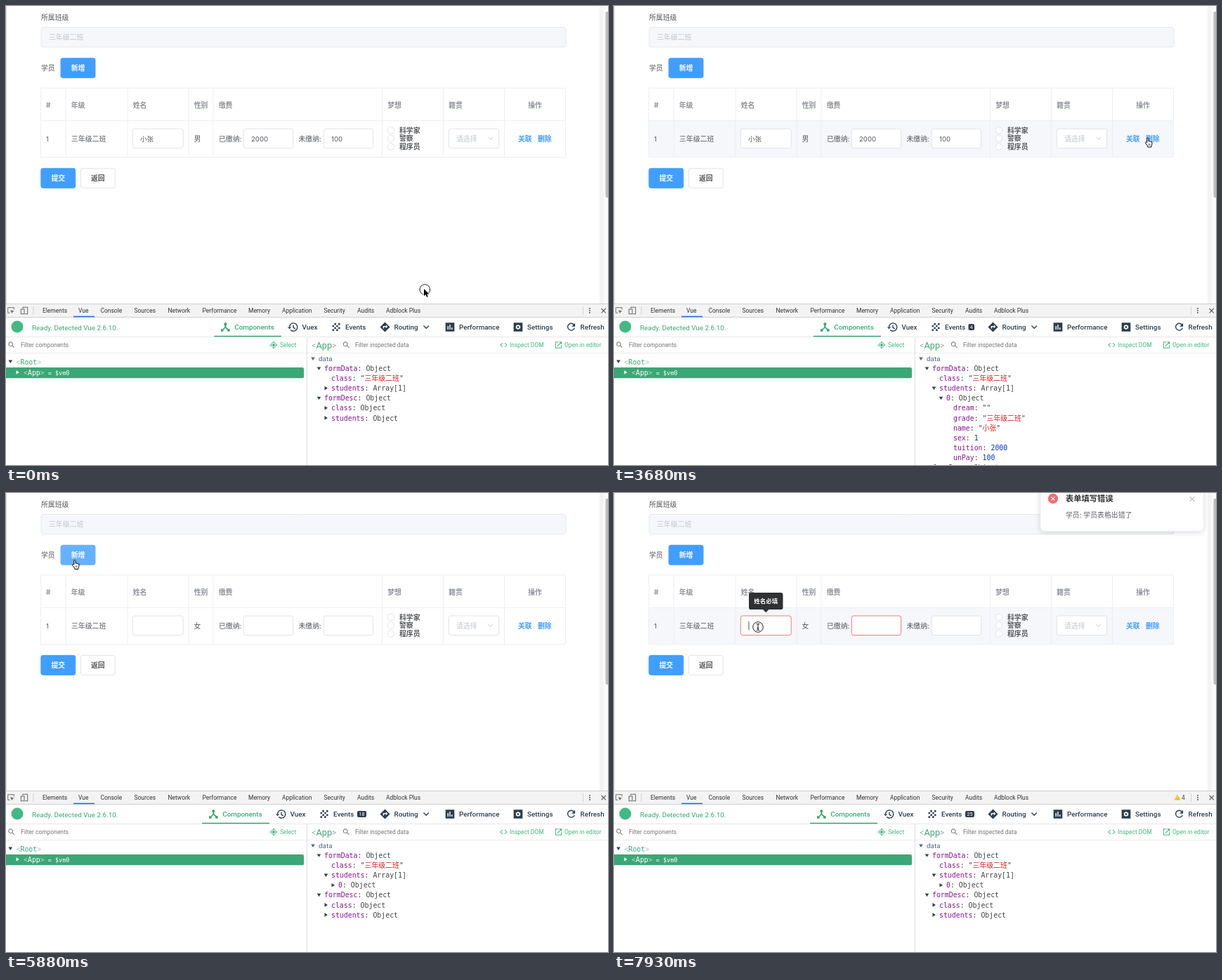
Write an HTML page with a canvas that moves like this. It is 857 px wide and 654 px high and loops after 8 s.

```html
<!DOCTYPE html>
<html lang="zh">
<head>
<meta charset="utf-8">
<title>Form and inspector</title>
<style>
html, body { margin: 0; width: 100%; height: 100%; overflow: hidden; background: #fff; }
canvas { display: block; }
</style>
</head>
<body>
<canvas id="stage" width="857" height="654"></canvas>
<script>
const ctx = document.getElementById('stage').getContext('2d');
const LOOP = 8000, STEP = 146.85;
const CJK = 'Inter, "Noto Sans CJK SC", "Noto Sans CJK", sans-serif';
const UI = 'Roboto, sans-serif';
const MONO = '"DejaVu Sans Mono", "Noto Sans CJK SC", "Noto Sans CJK", monospace';
const BLUE = '#409eff', LIGHT = '#66b1ff', DARK = '#3a8ee6';
const GREEN = '#3ba776', SLATE = '#2c3e50', INK = '#55575c', MUTED = '#909399', FAINT = '#c0c4cc';
const SM = 8.46, MD = 9.87, ROW = 14.1, CHAR = 5.942;

// Icons on a 24 unit grid: filled part, stroked part, stroke width
const ICONS = {
  hub: ['M9 6a3 3 0 1 1 4.5 2.5V12l5 4H21v5h-5v-3.2l-4-4-4 4V21H3v-5h4l3.5-4V8.5A3 3 0 0 1 9 6z'],
  history: ['M1 12h8l-4 4z', 'M5 12A8 8 0 1 1 7.3 17.7M12.7 8v5l4 2.3'],
  grain: ['', 'M10 6h.1M18 6h.1M6 10h.1M14 10h.1M10 14h.1M18 14h.1M6 18h.1M14 18h.1', 4],
  route: ['M12 2l10 10-10 10L2 12zM14 14.5V12h-4v3H8v-5h6V7.5l3.5 3.5z'],
  bars: ['M3 3h18v18H3zM7 10h2v7H7zM11 7h2v10h-2zM15 13h2v4h-2z'],
  gear: ['M3 3h18v18H3zM12 7l4.5 2.5v5L12 17l-4.5-2.5v-5zM12 10a2 2 0 1 1-.1 0z'],
  refresh: ['M13 11h7V4z', 'M17.5 7A7 7 0 1 0 18.7 14'],
  aim: ['M8 12a4 4 0 1 1 0 .1z', 'M19 12a7 7 0 1 1 0-.1M12 1v4M12 19v4M1 12h4M19 12h4'],
  code: ['', 'M8.7 6.7L3.4 12l5.3 5.3M15.3 6.7l5.3 5.3-5.3 5.3'],
  launch: ['', 'M12 4H4v16h16v-8M14 4h6v6M20 4L8.5 15.5'],
  search: ['', 'M15 9.5a5.5 5.5 0 1 1 0-.1M14 14l5.5 5.5'],
  edit: ['M3 17.2V21h3.8L17.8 9.9l-3.7-3.7zM15.1 5.1l2.6-2.6 3.8 3.8-2.6 2.6z'],
  add: ['M22 12a10 10 0 1 1 0-.1zM11 7h2v4h4v2h-4v4h-2v-4H7v-2h4z'],
  trash: ['M6 7h12v14H6zM5 4h3.5l1-1h5l1 1H19v2H5z'],
  more: ['', 'M12 6h.1M12 12h.1M12 18h.1', 4],
  inspect: ['M10 10l12 4-5 2-2 5z', 'M9 19H3V3h18v6'],
  device: ['', 'M8 6V3h13v18h-7M3 8h9v13H3z']
};
const ARROW = new Path2D('M0 0v10.3l2.4-2.2 1.6 3.6 1.7-.8-1.6-3.4h3.3z');
const HAND = new Path2D('M-1.2 6V.6a1.1 1.1 0 0 1 2.2 0V4l1.6.2 1.7.4 1.6.6v3.2l-1 2.8v1.3H-.2v-1.2L-3.3 7c-.8-1.2.6-2 1.4-1.2z');

// Pointer path: step, x, y
const PATH = [
  [0, 595, 403], [1, 595, 404], [4, 520, 478], [6, 451, 535], [7, 455, 543], [8, 456, 545],
  [11, 456, 546], [13, 447, 548], [15, 463, 557], [16, 466, 559], [19, 466, 560],
  [21, 560, 470], [22, 680, 320], [23, 752, 222], [24, 760, 188], [26, 760, 189],
  [28, 754, 198], [30, 754, 198], [31, 764, 212], [32, 690, 232], [33, 510, 222],
  [34, 300, 178], [35, 140, 128], [36, 66, 101], [37, 95, 97], [38, 98, 96],
  [41, 98, 96], [43, 95, 172], [44, 92, 234], [45, 90, 244], [46, 90, 245],
  [48, 92, 244], [50, 140, 214], [51, 180, 198], [52, 199, 192], [53, 204, 191], [54, 205, 191]
];

function pointer(n) {
  const i = PATH.findIndex(p => p[0] >= n);
  if (i <= 0) return PATH[i ? PATH.length - 1 : 0].slice(1);
  const a = PATH[i - 1], b = PATH[i], k = (n - a[0]) / (b[0] - a[0]);
  return [a[1] + (b[1] - a[1]) * k, a[2] + (b[2] - a[2]) * k];
}

const inside = ([x, y], x0, y0, x1, y1) => x >= x0 && x < x1 && y >= y0 && y < y1;

function text(s, x, y, color, size = MD, font = CJK, weight = 400, align = 'left') {
  ctx.font = `${weight} ${size}px ${font}`;
  ctx.fillStyle = color;
  ctx.textAlign = align;
  ctx.fillText(s, x, y + size * 0.37);
}

function rect(x, y, w, h, color) {
  ctx.fillStyle = color;
  ctx.fillRect(x, y, w, h);
}

function box(x, y, w, h, fill, line, r = 2.8) {
  ctx.beginPath();
  ctx.roundRect(x, y, w, h, r);
  if (fill) { ctx.fillStyle = fill; ctx.fill(); }
  if (line) { ctx.strokeStyle = line; ctx.lineWidth = 0.9; ctx.stroke(); }
}

function disc(x, y, r, fill, line, width = 1) {
  ctx.beginPath();
  ctx.arc(x, y, r, 0, Math.PI * 2);
  if (fill) { ctx.fillStyle = fill; ctx.fill(); }
  if (line) { ctx.strokeStyle = line; ctx.lineWidth = width; ctx.stroke(); }
}

function lines(d, color, width = 1) {
  ctx.strokeStyle = color;
  ctx.lineWidth = width;
  ctx.stroke(new Path2D(d));
}

function shape(d, color) {
  ctx.fillStyle = color;
  ctx.fill(new Path2D(d), 'evenodd');
}

function icon(name, x, y, size, color) {
  const [fill, line, width = 2] = ICONS[name], k = size / 24;
  ctx.save();
  ctx.translate(x - size / 2, y - size / 2);
  ctx.scale(k, k);
  ctx.lineCap = width > 2 ? 'round' : 'butt';
  if (fill) shape(fill, color);
  if (line) lines(line, color, width);
  ctx.restore();
}

function twisty(x, y, open, color = SLATE) {
  shape(open ? `M${x - 2.8} ${y - 2}h5.6l-2.8 4.4z` : `M${x - 2} ${y - 2.8}v5.6l4.4-2.8z`, color);
}

function button(label, x, y, fill) {
  const plain = !fill;
  box(x, y, 49, 28, fill || '#fff', fill || '#dcdfe6');
  text(label, x + 24.5, y + 14, plain ? INK : '#fff', MD, CJK, 700, 'center');
}

function field(x, w, value, line = '#dcdfe6') {
  box(x + 0.3, 175, w - 0.6, 27.6, '#fff', line);
  text(value, x + 11, 189, INK, 9.6);
}

function state(n) {
  const has = n < 26 || n >= 39;
  const badge = [[54, 25], [48, 23], [44, 21], [39, 18], [26, 7], [24, 4]].find(b => n >= b[0]);
  return {
    n, has, fresh: n >= 39, at: pointer(n), before: pointer(n - 1),
    badge: badge ? String(badge[1]) : '',
    open: n >= 9, deep: n >= 17 && n < 26,
    warn: n < 46 ? 0 : n < 48 ? 2 : 4,
    submitY: has ? 231 : 221.4
  };
}

function table(s) {
  const bottom = s.has ? 215.5 : 206, edge = '#ebeef5';
  if (s.has && inside(s.before, 50, 163, 797, 215)) rect(50, 163, 747, 52, '#f5f7fa');
  lines(`M49.5 117h747v${bottom - 117}h-747zM49.5 163.3h747`, edge);
  const cols = [85, 173, 260, 295, 535.5, 622.5, 709.5];
  lines(cols.map(x => `M${x} 117V${s.has ? bottom : 163}`).join(''), edge);
  const heads = ['#', '年级', '姓名', '性别', '缴费', '梦想', '籍贯'];
  heads.forEach((h, i) => text(h, i ? cols[i - 1] + 7.7 : 57, 141, MUTED, MD, CJK, 700));
  text('操作', 753, 141, MUTED, MD, CJK, 700, 'center');
  if (!s.has) return text('暂无数据', 423.5, 185, MUTED, MD, CJK, 400, 'center');

  const bad = s.n >= 47 ? '#f56c6c' : undefined;
  text('1', 57, 189, INK, 9.6);
  text('三年级二班', 93, 189, INK);
  field(180, 72.5, s.fresh ? '' : '小张', bad);
  text(s.fresh ? '女' : '男', 267.5, 189, INK);
  text('已缴纳:', 303, 189, INK);
  field(338, 71, s.fresh ? '' : '2000', bad);
  text('未缴纳:', 416.5, 189, INK);
  field(452, 71, s.fresh ? '' : '100');
  ['科学家', '警察', '程序员'].forEach((d, i) => {
    const y = 177 + i * 11.7;
    disc(548, y, 4.8, '#fff', '#dcdfe6', 0.8);
    text(d, 560, y, INK, MD, CJK, 700);
  });
  field(630, 72, '');
  text('请选择', 641, 189, FAINT);
  lines('M686.5 187l3.3 3.4 3.3-3.4', FAINT, 0.9);
  text('关联', 729, 189, BLUE, MD, CJK, 700);
  text('删除', 757, 189, BLUE, MD, CJK, 700);
}

function notice(n) {
  if (n < 46) return;
  const x = 607 + ([234, 12][n - 46] || 0);
  ctx.save();
  ctx.beginPath();
  ctx.rect(0, 0, 851, 424);
  ctx.clip();
  ctx.shadowColor = 'rgba(0,0,0,.16)';
  ctx.shadowBlur = 9;
  ctx.shadowOffsetY = 1.4;
  box(x, -12, 232.5, 66.5, '#fff', null, 5.6);
  ctx.shadowColor = 'transparent';
  box(x, -12, 232.5, 66.5, null, '#ebeef5', 5.6);
  disc(x + 18, 8, 7.2, '#f56c6c');
  lines(`M${x + 15.6} 5.6l4.8 4.8m0-4.8l-4.8 4.8`, '#fff', 1.2);
  text('表单填写错误', x + 36, 8, '#303133', 11.28, CJK, 700);
  text('学员: 学员表格出错了', x + 36, 31, '#606266');
  lines(`M${x + 212.5} 5l7 7m0-7l-7 7`, MUTED, 0.9);
  ctx.restore();
}

function page(s) {
  const { n, at } = s;
  rect(0, 0, 857, 424, '#fff');
  rect(845, 0, 6, 424, '#f4f4f4');
  rect(851, 0, 6, 424, '#fafafa');
  rect(0, 0, 1, 424, '#dcdcdc');
  box(853.5, 8, 5, 265, '#bcbcbc', null, 2);
  text('所属班级', 50, 16, INK);
  box(50, 30.5, 747, 28, '#f5f7fa', '#e4e7ed');
  text('三年级二班', 61, 44.5, FAINT);
  text('学员', 50, 88.5, INK);
  const addOn = inside(at, 78, 74, 127, 102) || (n >= 38 && n < 46);
  button('新增', 78, 74.3, n === 38 ? DARK : addOn ? LIGHT : BLUE);
  table(s);
  const y = s.submitY;
  const sendOn = inside(at, 50, y, 99, y + 28) || (n > 46 && n < 54);
  button('提交', 49.8, y + 0.3, n === 46 ? DARK : sendOn ? LIGHT : BLUE);
  button('返回', 106.3, y + 0.3);
  if (n >= 54) {
    box(192, 142, 48.5, 24, '#303133');
    shape('M212 166h8.4l-4.2 4.2z', '#303133');
    text('姓名必填', 216.2, 154, '#fff', SM, CJK, 700, 'center');
    rect(191.5, 183, 0.9, 12, '#444');
  }
  notice(n);
}

function toolbar(s) {
  rect(0, 424, 857, 20, '#f3f3f3');
  rect(0, 424, 857, 1, '#cfcfcf');
  rect(0, 443, 857, 1, '#cfcfcf');
  icon('inspect', 7, 434, 11.5, '#6a6a6a');
  icon('device', 26, 434, 12.5, '#6a6a6a');
  rect(38.5, 428, 0.8, 12, '#ccc');
  rect(821, 428, 0.8, 12, '#ccc');
  const tabs = { Elements: 52, Vue: 103, Console: 134.5, Sources: 182.5, Network: 230.5, Performance: 279.5,
    Memory: 345, Application: 393, Security: 452.5, Audits: 500, 'Adblock Plus': 541 };
  for (const t in tabs) text(t, tabs[t], 434, '#333', SM, UI);
  rect(96, 441.7, 30, 1.6, '#1a73e8');
  if (s.warn) {
    shape('M802 429.5l4.3 8h-8.6z', '#f5bd00');
    rect(801.6, 432.3, 0.8, 2.6, '#fff');
    text(s.warn, 808, 434, '#444', SM, UI);
  }
  icon('more', 831, 434, 12, '#5a5a5a');
  lines('M847.5 431l6.4 6.4m0-6.4l-6.4 6.4', '#5a5a5a', 1.1);
}

function header(s) {
  disc(16, 457, 8.5, '#42b983');
  text('Ready. Detected Vue 2.6.10.', 37, 458, GREEN, MD, UI);
  const shift = [0, -12, -17][s.badge.length];
  const tab = (name, glyph, x, color = SLATE) => {
    icon(glyph, x, 457.5, 16.9, color);
    text(name, x + 13, 457.5, color, MD, UI, 500);
  };
  tab('Components', 'hub', 312.3 + shift, GREEN);
  tab('Vuex', 'history', 408.5 + shift);
  tab('Events', 'grain', 470 + shift);
  tab('Routing', 'route', 539.5);
  tab('Performance', 'bars', 632);
  tab('Settings', 'gear', 729);
  tab('Refresh', 'refresh', 804.5);
  lines('M594.5 455.5l3.7 3.8 3.7-3.8', SLATE, 1.4);
  if (s.badge) {
    const w = s.badge.length > 1 ? 13 : 8.5;
    box(513 - w, 453, w, 9, SLATE, null, 2);
    text(s.badge, 513 - w / 2, 457.5, '#fff', 7, UI, 400, 'center');
  }
  rect(0, 471, 857, 0.8, '#e3e3e3');
  rect(296 + shift, 469.8, 96, 1.5, GREEN);
}

function treeRows(s) {
  const rows = [['formData', 'Object', 1, true], ['class', '"三年级二班"', 2],
    ['students', s.has ? 'Array[1]' : 'Array[0]', 2, s.open]];
  if (s.open && s.has) rows.push(['0', 'Object', 3, s.deep]);
  if (s.deep) rows.push(['dream', '""', 4], ['grade', '"三年级二班"', 4], ['name', '"小张"', 4],
    ['sex', '1', 4], ['tuition', '2000', 4], ['unPay', '100', 4]);
  return rows.concat([['formDesc', 'Object', 1, true], ['class', 'Object', 2, false], ['students', 'Object', 2, false]]);
}

function inspector(s) {
  twisty(437, 502.5, true, '#486887');
  text('data', 445, 502.3, '#486887', MD, UI);
  treeRows(s).forEach(([key, value, depth, open], i) => {
    const y = 502.3 + ROW * (i + 1), x = 443 + depth * 10;
    const vx = x + (key.length + 2) * CHAR;
    if (open !== undefined) twisty(x - 7.5, y, open);
    text(key, x, y, '#881391', MD, MONO);
    text(':', x + key.length * CHAR, y, '#444', MD, MONO);
    if (value[0] === '"') {
      const str = value.slice(1, -1), end = vx + CHAR + str.length * MD;
      text('"', vx, y, '#444', MD, MONO);
      text(str, vx + CHAR, y, '#d0211c', MD, MONO);
      text('"', end, y, '#444', MD, MONO);
    } else {
      text(value, vx, y, isNaN(value) ? '#444' : '#0033cc', MD, MONO);
    }
    if (open !== undefined && inside(s.at, 430, y - ROW / 2, 857, y + ROW / 2)) {
      const end = vx + value.length * CHAR;
      icon('edit', end + 10, y, 12, SLATE);
      icon('add', end + 29, y, 11.3, SLATE);
      icon('trash', end + 54, y, 12, SLATE);
      icon('more', end + 77, y, 11.3, SLATE);
    }
  });
  if (s.n >= 8 && s.n < 17) {
    ctx.strokeStyle = '#5a9bee';
    ctx.lineWidth = 2;
    ctx.strokeRect(462.5, 536.5, 393.8, 16.2);
  }
}

function panels(s) {
  rect(0, 444, 857, 210, '#fff');
  header(s);
  icon('search', 8, 483, 12.5, '#777');
  text('Filter components', 21, 483, '#777', SM, UI);
  icon('aim', 381, 483, 12, '#42b983');
  text('Select', 390, 483, '#42b983', SM, UI);
  text('<', 435, 483, '#aaa', 12.69, UI);
  text('App', 441.5, 483, GREEN, 12.69, UI);
  text('>', 464, 483, '#aaa', 12.69, UI);
  icon('search', 484.5, 483, 12.5, '#777');
  text('Filter inspected data', 497, 483, '#777', SM, UI);
  icon('code', 708.5, 483, 12.5, '#42b983');
  text('Inspect DOM', 717, 483, '#42b983', SM, UI);
  icon('launch', 786.5, 483, 12.5, '#42b983');
  text('Open in editor', 795, 483, '#42b983', SM, UI);
  rect(0, 494.3, 857, 0.8, '#e6e6e6');
  rect(428, 472, 0.9, 182, '#dcdcdc');

  twisty(6.3, 506.5, true);
  text('<', 14.5, 507, '#bbb', MD, MONO);
  text('Root', 14.5 + CHAR, 507, GREEN, MD, MONO);
  text('>', 14.5 + CHAR * 5, 507, '#bbb', MD, MONO);
  box(-4, 515, 428, 15.3, GREEN, null, 2.1);
  twisty(16.5, 522, false, '#fff');
  text('<', 25, 522.7, '#b9dfcd', MD, MONO);
  text('App', 25 + CHAR, 522.7, '#fff', MD, MONO);
  text('>', 25 + CHAR * 4, 522.7, '#b9dfcd', MD, MONO);
  text('= $vm0', 59.8, 522.7, '#fff', SM, MONO);
  inspector(s);
}

function drawPointer(s) {
  const { n, at, submitY: y } = s;
  const beam = s.has && inside(at, 180, 175, 252, 203);
  const hand = inside(at, 78, 74, 127, 102) || inside(at, 50, y, 155, y + 28) ||
    (s.has && inside(at, 729, 183, 777, 196)) || inside(at, 430, 508, 480, 654);
  if (n === 0 || n >= 54) disc(at[0] + (n ? 0 : 1.3), at[1] + (n ? 0 : 1), 7.3, null, '#222', 1);
  ctx.save();
  ctx.translate(at[0], at[1]);
  ctx.lineJoin = 'round';
  if (beam) {
    lines('M-2.3-4.8q2.3 0 2.3 1.5v6.6q0 1.5-2.3 1.5M2.3-4.8Q0-4.8 0-3.3M0 3.3q0 1.5 2.3 1.5M-1.3 1.5h2.6', '#111', 1);
  } else {
    ctx.fillStyle = hand ? '#fff' : '#000';
    ctx.strokeStyle = hand ? '#000' : '#fff';
    ctx.lineWidth = hand ? 1 : 1.4;
    const d = hand ? HAND : ARROW;
    if (hand) { ctx.fill(d); ctx.stroke(d); } else { ctx.stroke(d); ctx.fill(d); }
    if (hand) lines('M1.2 7.5v2.8M2.9 7.5v2.8', '#000', 0.6);
  }
  ctx.restore();
}

function draw(now) {
  const n = Math.floor((now % LOOP + 14) / STEP);
  const s = state(Math.min(n, 54));
  page(s);
  panels(s);
  toolbar(s);
  drawPointer(s);
  requestAnimationFrame(draw);
}
requestAnimationFrame(draw);
</script>
</body>
</html>
```
